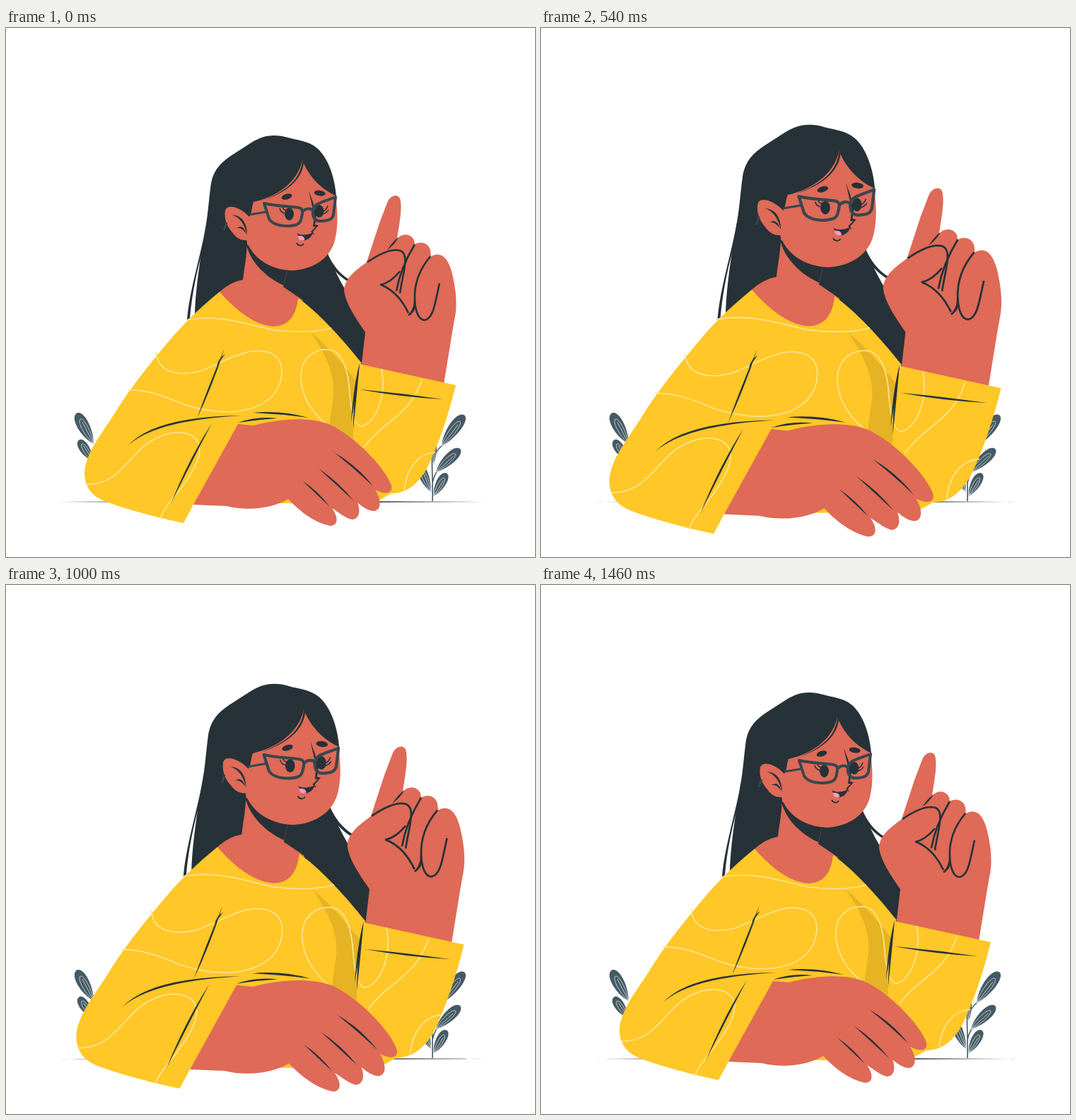
Write an HTML page that moves like this. It is 748x748 px and loops after 1.5 s.

```html
<!DOCTYPE html>
<html lang="en">
<head>
<meta charset="utf-8">
<title>Pointing woman</title>
<style>
  html, body { margin: 0; width: 100%; height: 100%; overflow: hidden; background: #fff; }
  svg { display: block; width: 100vw; height: 100vh; }
  .ink { fill: #263238; }
  .skin { fill: #de6a57; }
  .cloth { fill: #ffc727; }
  .leaf { fill: #455a64; }
  .vein { fill: none; stroke: #cfd8dc; stroke-width: .8; }
  .pattern { fill: none; stroke: #ffe38f; stroke-width: 1.7; }
  .pen { fill: none; stroke: #263238; stroke-width: 2.6; stroke-linejoin: round; }
  .frame { fill: none; stroke: #37474f; stroke-width: 4; stroke-linejoin: round; }
</style>
</head>
<body>
<svg viewBox="0 0 748 748">
  <path class="ink" d="M72 670L220 669.3H530L678 670L530 670.8H220Z"/>
  <g id="plants"></g>
  <g id="woman">
    <!-- hair -->
    <path class="ink" d="M379 152C366 152 357 156 347 162L319 180C304 190 294 200 290 219C287 240 286 260 282 283C277 312 268 365 267 405L300 420H420L503 476L512 430L481 372C469 352 462 336 454 318L467 238C465 212 456 184 440 170C427 159 412 159 399 155C392 153 386 152 379 152Z"/>
    <path class="ink" d="M283 278C276 320 259 372 256 413L260 410C263 375 271 338 279 312Z"/>
    <path class="ink" d="M454 317C461 334 472 348 486 356L484 359C470 350 460 340 454 325Z"/>

    <!-- neck -->
    <path class="skin" d="M341 300C341 320 337 338 335 356C323 358 312 364 301 374L330 430H405L420 385L392 366L397 340Z"/>
    <path class="ink" d="M340 306C345 331 369 354 393 364L398 340L360 315Z"/>
    <path d="M397 344L392 366" fill="none" stroke="#5c4746" stroke-width=".8"/>

    <!-- face -->
    <path class="skin" d="M350 246C382 239 412 219 419 187C429 212 448 229 466 237C469 260 470 280 465 300C459 324 437 341 405 343C371 342 347 323 340 300C331 301 324 295 320 289C312 280 308 269 310 258C313 248 331 253 344 267C348 261 347 254 350 246Z"/>
    <g id="face" class="ink">
      <path d="M419 187C417 210 402 229 362 244C397 233 419 214 421 190Z"/>
      <ellipse cx="397" cy="238.5" rx="7.6" ry="3.8" transform="rotate(-17 397 238.5)"/>
      <ellipse cx="443.7" cy="233.5" rx="8" ry="3.9" transform="rotate(7 443.7 233.5)"/>
      <ellipse cx="400.5" cy="263" rx="6.5" ry="9"/>
      <ellipse cx="443" cy="259" rx="6.3" ry="9"/>
      <path d="M428 230L434 246L439 265L437 278L442 279L434 288L436 293L431 288L438 281L434 281L436 265Z"/>
      <path d="M411 290C418 294 427 293 434 289C432 297 426 300 419 301C413 300 415 295 411 290Z"/>
    </g>
    <path d="M413 294C419 293 423 296 422 300C418 302 413 300 413 294Z" fill="#ff9cbd"/>
    <path class="pen" d="M411 304C413 308 418 309 421 305" style="stroke-width:1.8"/>
    <path class="pen" d="M394 262C390 261 388 259 387 255M396 258C393 257 391 255 391 252M448 259Q453 258 455 251M448 263Q454 261 456 257" style="stroke-width:1.5"/>
    <g class="frame">
      <path d="M365 248C382 252 400 252 413 254C420 255 420 260 418 267C417 278 410 279 400 280C388 280 377 278 372 270Z"/>
      <path d="M466 239L463 264C461 272 454 272 447 273C437 274 433 268 434 258C435 248 446 247 466 239Z"/>
      <path d="M419 260C423 255 430 254 434 258"/>
      <path d="M368 260L344 264M312 275L308 286" style="stroke-width:3"/>
    </g>

    <!-- raised hand -->
    <path class="skin" d="M510 331L528 276L539 247C543 236 554 234 557 241C561 254 556 277 553 298C560 290 572 290 577 300L578 306C587 301 597 304 600 314L601 323C617 314 628 328 633 357C637 378 638 395 634 413L631 430L618 510L502 482L508 430C495 411 479 388 478 370C480 351 499 340 510 331Z"/>
    <g class="pen">
      <path d="M511 331C530 318 546 311 558 315C571 321 561 347 557 375"/>
      <path d="M578 306C567 324 556 349 552 372"/>
      <path d="M557 344C548 355 539 361 530 363C550 371 561 386 569 403"/>
      <path d="M600 323C584 342 577 362 578 384C578 397 575 403 569 406"/>
      <path d="M578 385C579 402 584 413 592 413C605 411 607 386 613 361"/>
    </g>

    <!-- sweater -->
    <path class="cloth" d="M302 373C316 389 347 421 379 422C404 421 411 400 413 382C440 401 473 436 503 474L499 475L636 505C626 545 612 590 594 625C580 648 564 658 545 658L520 672H266L251 700C213 692 172 681 145 671C123 664 111 650 111 629C113 600 134 576 153 546C174 511 203 475 237 435C259 410 281 390 302 373Z"/>
    <path d="M431 430C451 460 466 489 463 520L456 572L491 580L490 535L496 500C477 476 456 451 431 430Z" fill="#e5b324"/>
    <g class="pattern">
      <path d="M254 413C301 404 340 419 378 427C410 431 442 430 460 424"/>
      <path d="M213 458C213 485 240 494 275 485C311 472 343 447 375 460C397 471 392 502 377 520C349 549 295 547 251 532C218 518 196 511 172 512"/>
      <path d="M462 566C434 549 415 519 417 488C420 462 440 453 458 455C475 458 482 480 485 505C487 540 492 563 502 563C521 561 539 522 531 482"/>
      <path d="M507 592C535 554 571 549 588 497"/>
      <path d="M563 653C567 619 585 601 607 600"/>
      <path d="M114 645C150 646 166 620 184 602C205 578 239 565 262 576C286 590 270 620 248 650C233 669 222 681 218 694"/>
    </g>

    <!-- resting hand -->
    <path class="skin" d="M328 560L350 562C384 553 426 549 456 560C495 577 538 625 545 647C547 658 538 661 522 653C531 667 531 681 521 683C513 683 505 678 497 671C502 684 499 694 490 695C481 694 471 685 461 679C470 692 470 703 459 704C437 700 416 684 399 666C379 678 345 684 312 676L265 674Z"/>
    <g id="folds" class="ink"></g>
  </g>
</svg>
<script>
  const LOOP = 1500, STEPS = 36, CX = 373.5, CY = 428;
  // Heartbeat: step in the loop, share of the full swell
  const BEAT = [[0, 0], [6.5, 1], [6.9, 1], [20.5, 0], [21.3, 0], [27.4, 1], [27.7, 1], [34.8, 0], [36, 0]];
  const byId = id => document.getElementById(id);

  // Brush stroke with pointed ends: start, bend, end, thickness
  function brush(x0, y0, bx, by, x1, y1, w) {
    const len = Math.hypot(x1 - x0, y1 - y0);
    const nx = (y0 - y1) / len * w, ny = (x1 - x0) / len * w;
    return `<path d="M${x0} ${y0}Q${bx + nx} ${by + ny} ${x1} ${y1}Q${bx - nx} ${by - ny} ${x0} ${y0}Z"/>`;
  }

  function blade(len, w) {
    return `M0 0C${len * .3} ${-w} ${len * .96} ${-w * 1.3} ${len} ${-w * .1}` +
      `C${len * .98} ${w * .9} ${len * .4} ${w * .9} 0 0Z`;
  }

  function leaf(x0, y0, x1, y1, w) {
    const len = Math.hypot(x1 - x0, y1 - y0);
    const turn = Math.atan2(y1 - y0, x1 - x0) * 180 / Math.PI;
    return `<g transform="translate(${x0} ${y0}) rotate(${turn})">
      <path class="leaf" d="${blade(len, w)}"/>
      <path class="vein" d="${blade(len * .8, w * .5)}M0 0H${len * .7}"/></g>`;
  }

  byId('plants').innerHTML =
    leaf(124, 588, 101, 544, 11) + leaf(123, 612, 104, 582, 9) +
    '<path d="M603 669C604 640 601 612 603 580M603 643Q606 628 617 618M603 613Q606 599 617 590" fill="none" stroke="#455a64" stroke-width="1.6"/>' +
    leaf(616, 591, 649, 548, 11) + leaf(608, 628, 643, 596, 10) +
    leaf(605, 662, 624, 630, 9) + leaf(601, 656, 584, 614, 9) + leaf(605, 616, 605, 582, 6);

  byId('folds').innerHTML = [
    [173, 590, 211, 552, 333, 548, 2.8], [270, 552, 290, 504, 309, 453, 2.6],
    [298, 478, 302, 468, 310, 461, 1.8], [233, 673, 260, 612, 291, 559, 2.6],
    [328, 558, 355, 551, 384, 552, 2.6], [349, 544, 389, 543, 428, 551, 2.8],
    [500, 474, 494, 507, 488, 557, 2.8], [500, 474, 493, 525, 491, 567, 2.4],
    [500, 511, 558, 519, 618, 525, 2.8], [464, 600, 496, 622, 519, 648, 2.8],
    [442, 623, 469, 644, 492, 669, 2.6], [419, 640, 440, 657, 458, 677, 2.4],
    [319, 264, 338, 267, 341, 293, 3], [326, 283, 334, 279, 340, 291, 2.6],
    [539, 314, 549, 303, 555, 296, 2.6], [570, 404, 577, 402, 579, 386, 3.5]
  ].map(f => brush(...f)).join('');

  function swell(step) {
    const i = BEAT.findIndex(k => k[0] > step);
    const [a, va] = BEAT[i - 1], [b, vb] = BEAT[i];
    return va + (vb - va) * (step - a) / (b - a);
  }

  const woman = byId('woman');
  function draw(now) {
    const t = now % LOOP;
    const step = Math.min(STEPS - 1, Math.floor((t + 6) * STEPS / LOOP));
    const s = 1 + .1 * swell(step);
    woman.setAttribute('transform', `translate(${CX} ${CY}) scale(${s}) translate(${-CX} ${-CY})`);
  }

  let start;
  function tick(now) {
    start ??= now;
    draw(now - start);
    requestAnimationFrame(tick);
  }
  draw(0);
  requestAnimationFrame(tick);
</script>
</body>
</html>
```
